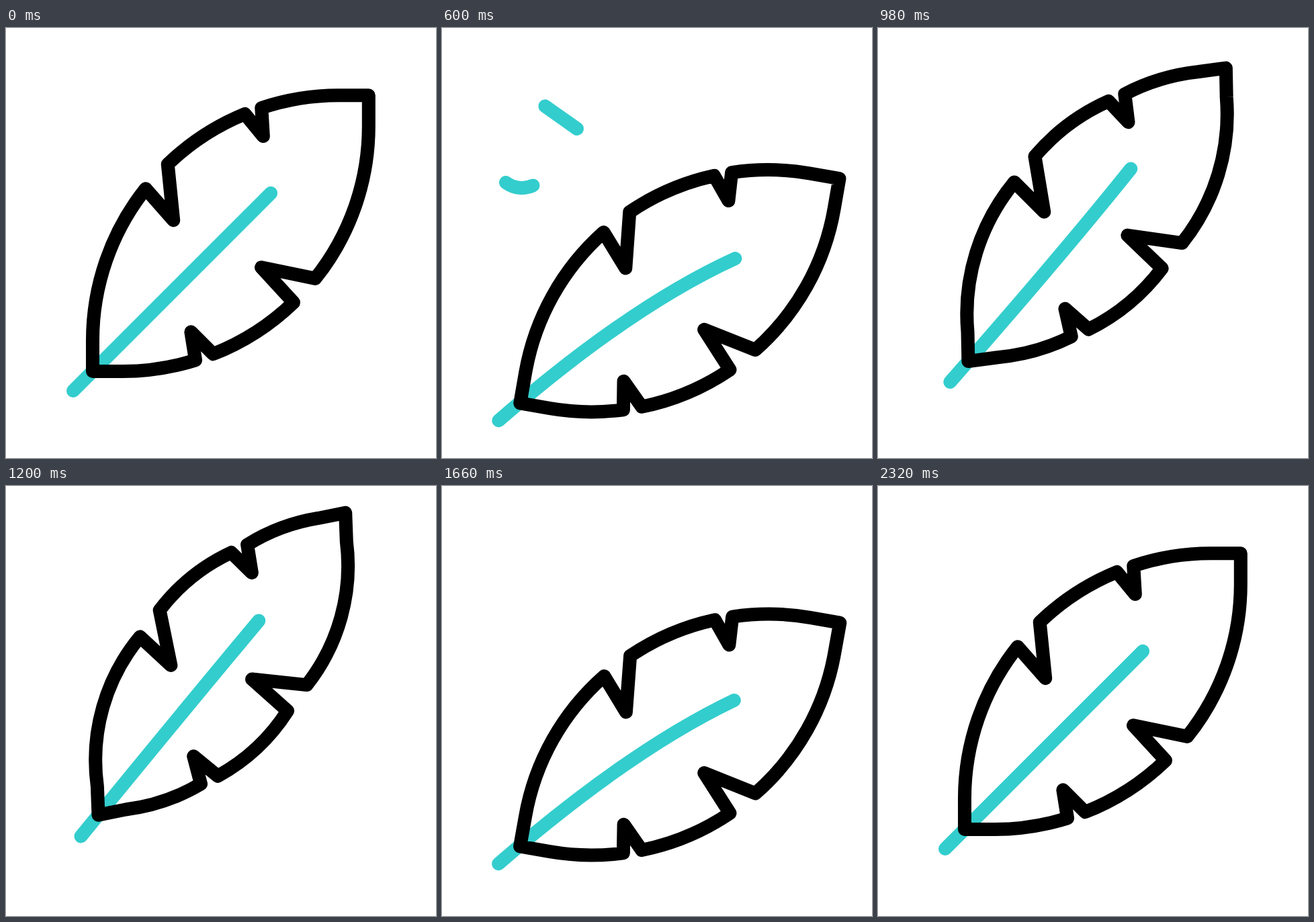
An HTML page that plays this animation: 640x640 px, repeating every 3.6 s.

```html
<!DOCTYPE html>
<html lang="en">
<head>
<meta charset="utf-8">
<title>Feather in the wind</title>
<style>
  html, body { margin: 0; height: 100%; overflow: hidden; background: #fff; }
  svg { display: block; width: 100%; height: 100%; }
  path { fill: none; stroke-width: 20; stroke-linecap: round; stroke-linejoin: round; }
  .teal { stroke: #33cdcd; }
  .ink { stroke: #000; }
</style>
</head>
<body>
<svg viewBox="0 0 640 640">
  <path id="gust" class="teal" d="M78 63L201 150"/>
  <path id="curl" class="teal" d="M91 129L142 165A40 40 0 0 1 159 198A40 40 0 0 1 95 230"/>
  <g id="feather">
    <path id="stem" class="teal"/>
    <path id="vane" class="ink"/>
  </g>
</svg>
<script>
(() => {
  const LOOP = 3600;
  const LENGTH = 581;   // quill to tip
  const RADIUS = 363;   // the vane is a lens of two such arcs
  const $ = id => document.getElementById(id);

  const ease = (t, from, to) => {
    const s = Math.min(1, Math.max(0, (t - from) / (to - from)));
    return (1 - Math.cos(Math.PI * s)) / 2;
  };

  // Eased swings between [time, value] turning points
  const swing = (...keys) => t => keys.reduce((v, [time, value], i) =>
    i ? v + (value - keys[i - 1][1]) * ease(t, keys[i - 1][0], time) : value, 0);

  const tilt = swing([80, 0], [570, 10], [1130, -6.4], [1680, 10.1], [2300, 0]);
  const drop = swing([0, 0], [575, 63], [1115, -34], [1635, 41], [2220, 0]);
  const narrow = swing([0, 0], [310, 1], [600, 0], [1190, .95], [1720, 0]);
  const stemTip = swing([0, 0], [460, 11], [1000, -7.5], [1400, 11], [1960, -4], [2320, 0]);

  // Notches of each side: where they open and close on the arc,
  // their inner corner, and how they move as the vane narrows
  const upper = [
    { open: 248, close: 297, corner: [244, -74], move: [-3.5, 17.5] },
    { open: 431, close: 455, corner: [427, -68], move: [-3.5, 17.5] }
  ];
  const lower = [
    { open: 249, close: 297, corner: [294, -68], move: [-15, 20] },
    { open: 436, close: 461, corner: [436, -62], move: [-13, 8] }
  ];

  const onArc = x => [x, 224 - Math.sqrt(RADIUS ** 2 - (x - LENGTH / 2) ** 2)];

  // One side of the vane; the other is the same turned half round
  function side(notches, n, turned) {
    const r = RADIUS - 80 * n;
    const put = ([x, y]) => turned ? `${LENGTH - x} ${-y}` : `${x} ${y}`;
    const line = p => `L${put(p)}`;
    const arc = p => `A${r} ${r} 0 0 1 ${put(p)}`;
    let d = line([0, 0]) + line([32, -32 + 4 * n]);
    for (const { open, close, corner, move } of notches) {
      const moved = ([x, y]) => [x + move[0] * n, y + move[1] * n];
      d += arc(moved(onArc(open))) + line(moved(corner)) + line(moved(onArc(close)));
    }
    return d + arc([LENGTH - 32, -32 + 6 * n]);
  }

  function trim(path, start, end) {
    const size = path.getTotalLength();
    path.style.display = end - start > .002 ? '' : 'none';
    path.style.strokeDasharray = `${(end - start) * size} ${2 * size}`;
    path.style.strokeDashoffset = -start * size;
  }

  function draw(t) {
    const angle = tilt(t), n = narrow(t);
    const bow = -2.4 * Math.max(0, angle);
    $('feather').setAttribute('transform',
      `translate(210 ${430 + drop(t)}) rotate(${angle - 45}) translate(-114.6 0)`);
    $('vane').setAttribute('d', 'M0 0' + side(upper, n, false) + side(lower, n, true) + 'Z');
    $('stem').setAttribute('d',
      `M-41 ${-.12 * bow}Q215 ${bow} ${375 - .45 * bow} ${stemTip(t)}`);
    trim($('gust'), ease(t, 372, 772), ease(t, 120, 520));
    trim($('curl'), ease(t, 382, 702), ease(t, 93, 413));
  }

  function tick() {
    draw(performance.now() % LOOP);
    requestAnimationFrame(tick);
  }
  tick();
})();
</script>
</body>
</html>
```
